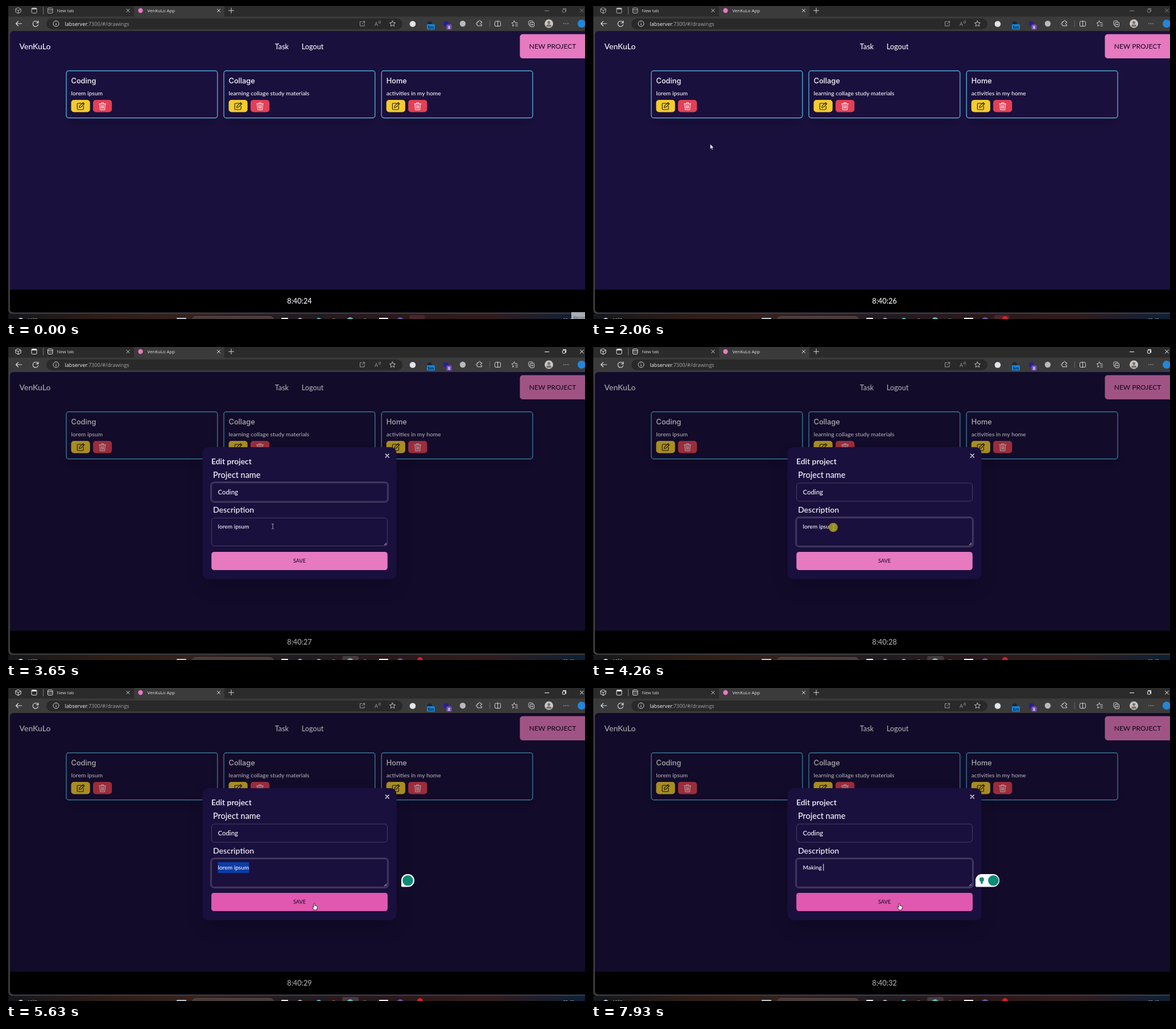
Recreate the animation shown at these times as an HTML page with a canvas. Size 1018 by 550 pixels, loop 7.99 s.

```html
<!DOCTYPE html>
<html lang="en">
<head>
<meta charset="utf-8">
<title>VenKuLo App</title>
<style>
html, body { margin: 0; width: 100%; height: 100%; overflow: hidden; background: #000; }
canvas { display: block; width: 1018px; height: 550px; }
</style>
</head>
<body>
<canvas id="stage" width="1018" height="550"></canvas>
<script>
const stage = document.getElementById('stage');
const layer = stage.cloneNode().getContext('2d');
let ctx = stage.getContext('2d');
const LOOP = 7990;
const UI = 'Lato, "Open Sans", sans-serif';
const HEAD = 'Inter, sans-serif';
const SYS = '"Open Sans", sans-serif';
const BASE = '#1a103d', PINK = '#e779c1', CYAN = '#58c7f3', INK = '#f9f7fd';
const GOLD = '#f3cc30', RED = '#e24056';

// Moments of the story, in ms
const OPEN = 2928, ACTIVE = 3200, PRESS = 4250, RELEASE = 4790, CLEAR = 6000, PILL = 7000;
const KEYS = [6690, 6850, 7050, 7230, 7400, 7540, 7700];
const WORD = 'Making ';
const PATH = [
  [1520, 728, 553], [1720, 600, 460], [1900, 345, 305], [2060, 210, 243], [2260, 121, 210],
  [2400, 119, 179], [3150, 119, 179], [3600, 469, 315], [3990, 469, 315], [4180, 428, 317],
  [4300, 426, 317], [4680, 363, 307], [4850, 363, 307], [5350, 541, 380], [5560, 543, 384]
];

const clamp = (v, a = 0, b = 1) => Math.min(b, Math.max(a, v));
const ramp = (t, start, len) => clamp((t - start) / len);
const easeOut = x => 1 - (1 - x) ** 3;

function box(x, y, w, h, r, fill, stroke, lw = 1) {
  ctx.beginPath();
  ctx.roundRect(x, y, w, h, r);
  if (fill) { ctx.fillStyle = fill; ctx.fill(); }
  if (stroke) { ctx.strokeStyle = stroke; ctx.lineWidth = lw; ctx.stroke(); }
}

function disc(x, y, r, fill, stroke, lw) {
  box(x - r, y - r, 2 * r, 2 * r, r, fill, stroke, lw);
}

function text(s, x, y, size, color, { font = UI, weight = 500, align = 'left' } = {}) {
  ctx.font = `${weight} ${size}px ${font}`;
  ctx.textAlign = align;
  ctx.fillStyle = color;
  ctx.fillText(s, x, y);
}

function width(s, size) {
  ctx.font = `500 ${size}px ${UI}`;
  return ctx.measureText(s).width;
}

function icon(d, x, y, stroke, lw = 1, fill) {
  const p = new Path2D(d);
  ctx.save();
  ctx.translate(x, y);
  ctx.lineCap = ctx.lineJoin = 'round';
  if (fill) { ctx.fillStyle = fill; ctx.fill(p); }
  if (stroke) { ctx.strokeStyle = stroke; ctx.lineWidth = lw; ctx.stroke(p); }
  ctx.restore();
}

function cross(x, y, r, color, lw = 1) {
  icon(`M${-r} ${-r}L${r} ${r}M${r} ${-r}L${-r} ${r}`, x, y, color, lw);
}

// A panel whose shadow is cast by a box smaller by `inset`
function panel(x, y, w, h, r, { alpha, blur, dy, inset }) {
  ctx.save();
  ctx.shadowColor = `rgba(0,0,0,${alpha})`;
  ctx.shadowBlur = blur;
  ctx.shadowOffsetY = dy;
  box(x + inset, y + inset, w - 2 * inset, h - 2 * inset, r, BASE);
  ctx.restore();
  box(x, y, w, h, r, BASE);
}

// Paint on a layer so that overlapping parts fade as one
function grouped(alpha, paint) {
  const main = ctx;
  ctx = layer;
  ctx.clearRect(0, 0, 1018, 550);
  paint();
  ctx = main;
  ctx.globalAlpha = alpha;
  ctx.drawImage(layer.canvas, 0, 0);
  ctx.globalAlpha = 1;
}

const STAR = 'M0 -5L1.5 -1.7L5 -1.4L2.4 1L3.2 4.6L0 2.7L-3.2 4.6L-2.4 1L-5 -1.4L-1.5 -1.7Z';

function drawTabs(active) {
  const c = active ? '#e6e6e6' : '#b4b4b4';
  const ctl = active ? '#fff' : '#858585';
  box(4, 0, 1014, 19, 0, '#2b2b2b');
  box(4, 18.5, 1014, 522.5, [0, 0, 0, 6], '#3b3b3b');
  box(225, -6, 159, 26, 5, '#3b3b3b');

  icon('M0 -5L4.6 -2.5V2.5L0 5L-4.6 2.5V-2.5ZM-4.6 -2.5L0 0L4.6 -2.5M0 0V5', 21.5, 8, c, 1);
  box(45, 3.5, 9, 9, 1.5, null, c, 1);
  box(45, 3.5, 9, 2.5, 1, c);
  icon('M0 -6V6', 65.5, 8, '#777', 1);
  box(73.5, 3.5, 8.5, 9, 1.5, null, c, 1);
  icon('M-4 -1.5H4M-2 1.5H-1.8M0 1.5H.2M2 1.5H2.2', 77.8, 8, c, 1);
  text('New tab', 89.5, 11, 7.8, '#d6d6d6', { font: SYS, weight: 400 });
  cross(214.5, 8, 2.6, '#d0d0d0');
  disc(236.5, 8, 4.2, PINK);
  text('VenKuLo App', 248.5, 11, 7.8, '#e6e6e6', { font: SYS, weight: 400 });
  cross(374, 8, 2.6, '#e0e0e0');
  icon('M-4.5 0H4.5M0 -4.5V4.5', 396, 8, '#d6d6d6');

  icon('M-3.5 0H3.5', 951, 8.5, ctl);
  box(978.5, 6, 5, 5, 1, null, ctl, 1);
  icon('M-1.5 -3.5H3.5V1.5', 981, 8, ctl);
  cross(1012.5, 8, 3, ctl);
}

function drawToolbar() {
  const c = '#cfcfcf', dim = '#9a9a9a';
  icon('M5 0H-5M-1 -4L-5 0L-1 4', 22.5, 31, '#e2e2e2', 1.1);
  icon('M4.6 -1A4.8 4.8 0 1 0 4.6 1.6M4.8 -5V-1.2H1', 52, 31, '#e2e2e2', 1.1);
  box(71, 22, 626, 19, 9.5, '#292929');
  disc(88, 31, 5, null, c, 1);
  icon('M0 -.5V2.4M0 -2.6V-2.5', 88, 31, c, 1.1);
  text('labserver', 103.5, 34.5, 9.1, '#f4f4f4', { font: SYS, weight: 400 });
  text(':7300/#/drawings', 142.5, 34.5, 9.1, '#a5a5a5', { font: SYS, weight: 400 });

  icon('M-1 -3.5H-4V4H3.5V1M1 -4H4V-1M4 -4L-.5 .5', 626.5, 31, dim);
  text('A', 648, 35, 9.5, dim, { font: SYS, weight: 400 });
  icon('M0 -2Q1.4 -.5 0 1M2 -3.5Q4 -.7 2 2', 655.5, 29, dim, .9);
  icon(STAR, 679.5, 31, c, .9);

  disc(715, 31.5, 5.3, '#e2e4e8');
  disc(745, 31, 4, '#1c2733');
  box(740, 32, 14, 9.5, 1.5, '#1683d8');
  text('5m', 747, 39.5, 7, '#06131f', { font: SYS, weight: 600, align: 'center' });
  box(770, 27, 8, 8, 1, '#27208c');
  box(774.5, 32.5, 9, 9, 1.5, '#7a4fc0');
  text('8', 779, 40, 7, '#fff', { font: SYS, weight: 600, align: 'center' });
  disc(803, 31, 5.2, '#b9b9b9');
  icon('M-3.5 -3H-1.2A1.6 1.6 0 1 1 1.6 -3H4V-.6A1.6 1.6 0 1 0 4 2V4.4H-3.5V2A1.6 1.6 0 1 1 -3.5 -.6Z', 832.5, 30.5, c);
  icon('M0 -5.5V5.5', 850.5, 31, '#666');
  box(859.5, 27, 10, 8.5, 1.5, null, c, 1);
  icon('M0 -5V5', 864.5, 31, c);
  icon('M-1 -5L.5 -1.8H4.5M-1 -5L-2.4 -1.8L-5.5 -1.4L-3 1L-3.8 4.5L-1 2.8M1.5 1H5M1.5 4H5', 894.5, 31, c);
  box(919, 26, 7, 8, 1.5, null, c, 1);
  box(921.5, 28.5, 7, 8, 1.5, '#3b3b3b', c, 1);
  icon('M-1.7 0H1.7M0 -1.7V1.7', 925, 32.5, c, .9);
  disc(954.5, 31, 7.5, '#c9c6c3');
  disc(954.5, 29, 2.5, '#77726f');
  box(950, 32.5, 9, 4, [4, 4, 1, 1], '#77726f');
  for (let i = -1; i < 2; i++) disc(984.5 + i * 3.6, 31, .8, c);
  disc(1012, 31, 7, '#2287d8');
}

function drawTaskbar(t) {
  const g = ctx.createLinearGradient(0, 0, 1018, 0);
  ['#14171c', '#2e1d14', '#35221d', '#211c22', '#2b181a', '#321b1c', '#0c2137']
    .forEach((c, i) => g.addColorStop(i / 6, c));
  box(4, 541, 1014, 9, 0, g);
  disc(26, 553, 5, '#c9d4df');
  text('10°C', 38, 553.5, 7.6, '#f1f1f1', { font: SYS, weight: 400 });
  text('09:40', 979.5, 554, 7.6, '#f1f1f1', { font: SYS, weight: 400 });
  box(300, 548, 17, 9, 1, '#b8c8d2');
  box(327, 545.5, 144, 14, 7, '#493b39', '#6b5855', .7);
  if (t >= 2700) box(591, 543, 29, 10, 3, '#44393d');
  else box(709, 543, 27, 10, 3, '#4b2530');
  box(484, 548, 12, 8, 1, '#f0f0f0');
  disc(517, 553, 5, '#b3aeb1');
  disc(550, 553, 5, '#4ec5c2');
  disc(576, 554, 5, '#ae7555');
  disc(605, 553, 6, '#52c6bd');
  disc(631, 554, 5, '#4d8b65');
  box(656, 548, 16, 7, 0, '#fff');
  disc(693, 553, 6, '#6958aa');
  if (t >= 200) disc(728, 550, 5, '#d5202a');
}

function drawTip(t) {
  ctx.globalAlpha = 1 - ramp(t, 1190, 190);
  box(994, 538, 30, 14, 0, '#a9adb6');
  text('Record', 997, 549.5, 7.6, '#50545c', { font: SYS, weight: 400 });
  ctx.globalAlpha = 1;
}

function drawCard(x, title, note) {
  panel(x, 113.9, 265.8, 82.7, 4, { alpha: .14, blur: 17, dy: 13, inset: 3 });
  box(x, 113.9, 265.8, 82.7, 4, null, CYAN, 1.2);
  text(title, x + 8.5, 136, 12.8, INK, { font: HEAD });
  text(note, x + 8.5, 156.5, 10.3, INK);
  box(x + 8.5, 165, 33.2, 21.5, 5, GOLD);
  box(x + 47, 165, 33.2, 21.5, 5, RED);
  icon('M1 -5H-4.5Q-6 -5 -6 -3.5V4.5Q-6 6 -4.5 6H3.5Q5 6 5 4.5V0M-2.5 2.5L-1.8 -.6L4.3 -6.4L6.6 -4.2L.6 1.8ZM3 -5L5.2 -2.9',
    x + 25.2, 176, '#211a08', 1.1);
  icon('M-6 -4H6M-2 -4V-6H2V-4M-4.8 -4L-4 6.4H4L4.8 -4M-2 -1.5L-1.8 4M0 -1.5V4M2 -1.5L1.8 4',
    x + 63.6, 176, INK, 1);
}

function drawPage(t) {
  ctx.save();
  ctx.beginPath();
  ctx.roundRect(7, 44, 1020, 494.5, 6);
  ctx.clip();
  box(7, 44, 1011, 495, 0, BASE);
  text('VenKuLo', 23.5, 76.3, 14, INK);
  text('Task', 472.8, 76, 12.6, INK);
  text('Logout', 519.8, 76, 12.6, INK);
  box(903.5, 49.5, 125, 42.5, 5, PINK);
  text('NEW PROJECT', 961, 75.2, 12, '#230e2a', { align: 'center' });
  drawCard(106, 'Coding', 'lorem ipsum');
  drawCard(383, 'Collage', 'learning collage study materials');
  drawCard(660.2, 'Home', 'activities in my home');
  box(7, 498.5, 1011, 40, 0, '#000');
  text('8:40:' + (24 + Math.floor((t + 200) / 1000)), 516, 523, 12.8, INK, { align: 'center' });

  const p = easeOut(ramp(t, OPEN, 200));
  if (p > 0) {
    // The scrim colour and its opacity ease in together
    box(7, 44, 1011, 495, 0, `rgba(0,0,0,${.31 * p * p})`);
    grouped(p, () => drawModal(t, .9 + .1 * p));
  }
  ctx.restore();
}

function caret(x, y, t, since) {
  if ((t - since) % 1000 < 500) box(x, y, 1, 12, 0, INK);
}

function field(y, h, focused) {
  box(361.5, y, 309, h, 5, BASE, 'rgba(249,247,253,.2)', 1);
  if (focused) box(359.9, y - 1.7, 312.2, h + 3.4, 6, null, 'rgba(249,247,253,.26)', 1.2);
}

// Index of the letter edge nearest to the pointer
function edgeAt(s, x) {
  let best = 0, gap = Math.abs(x);
  for (let i = 1; i <= s.length; i++) {
    const d = Math.abs(width(s.slice(0, i), 10.2) - x);
    if (d < gap) { best = i; gap = d; }
  }
  return best;
}

function drawDescription(t) {
  const x = 372.5, y = 319.3, size = 10.2, old = 'lorem ipsum';
  if (t < CLEAR) {
    if (t >= PRESS) {
      const px = pointer(Math.min(t, RELEASE))[0];
      const from = width(old.slice(0, edgeAt(old, px - x)), size);
      const end = width(old, size);
      if (from < end) box(x + from, 306, end - from, 19, 0, '#0b3ca4');
      else caret(x + end, 309, t, PRESS);
    }
    text(old, x, y, size, INK);
    return;
  }
  const n = KEYS.filter(k => t >= k).length;
  const typed = WORD.slice(0, n);
  text(typed, x, y, size, INK);
  caret(x + width(typed, size), 309, t, n ? KEYS[n - 1] : CLEAR);
}

function drawModal(t, scale) {
  ctx.save();
  ctx.translate(516, 292);
  ctx.scale(scale, scale);
  ctx.translate(-516, -292);
  panel(345.5, 176, 341, 232, 10, { alpha: .25, blur: 33, dy: 16, inset: 8 });
  text('Edit project', 361, 205.5, 13.9, INK, { weight: 600 });
  cross(670.3, 191, 3, INK, 1.2);
  text('Project name', 364, 229.6, 14.4, INK);
  text('Description', 364, 290.8, 14.1, INK);
  field(239, 32, t < PRESS);
  text('Coding', 372.5, 259.2, 11.4, INK);
  if (t < PRESS) caret(373 + width('Coding', 11.4), 249, t, OPEN);
  field(300.5, 49, t >= PRESS);
  icon('M-4 0L0 -4M-1.5 0L0 -1.5', 669, 348, '#d8d5df', .9);
  drawDescription(t);
  box(361.2, 359.9, 309.6, 32.2, 5, PINK);
  const hover = ramp(t, 5320, 180);
  if (hover) box(361.2, 359.9, 309.6, 32.2, 5, `rgba(224,88,176,${hover})`);
  text('SAVE', 516, 379.4, 9.2, '#230e2a', { align: 'center' });
  ctx.restore();
}

function drawHelper(t) {
  if (t < PRESS + 150) return;
  ctx.globalAlpha = ramp(t, PRESS + 150, 120);
  const grow = easeOut(ramp(t, PILL, 220));
  const x = 695 - 19 * grow;
  box(x, 327, 718 - x, 22.5, [11, 11, 11, 2], '#fff');
  if (grow > .6) {
    disc(687, 336.5, 4, '#0f8a78');
    box(685.3, 339.5, 3.4, 4.5, 1, '#0f8a78');
  }
  disc(706.5 + grow, 338.3, 9.3, '#0f8a78');
  ctx.globalAlpha = 1;
}

function pointer(t) {
  const i = PATH.findIndex(k => k[0] > t);
  if (i < 0) return PATH[PATH.length - 1].slice(1);
  if (!i) return PATH[0].slice(1);
  const [t0, x0, y0] = PATH[i - 1], [t1, x1, y1] = PATH[i];
  const f = (t - t0) / (t1 - t0);
  return [x0 + (x1 - x0) * f, y0 + (y1 - y0) * f];
}

function drawPointer(t) {
  if (t < PATH[0][0]) return;
  const [x, y] = pointer(t);
  const down = (t >= 2760 && t < 2860) || (t >= PRESS && t < RELEASE);
  if (down) disc(x - .7, y, 8, '#958b1b');
  const inModal = t > OPEN && x > 361 && x < 671;
  if (inModal && ((y > 300 && y < 350) || (y > 239 && y < 271))) {
    icon('M-1.6 -4.3Q0 -4.3 0 -3.5Q0 -4.3 1.6 -4.3M0 -3.5V3.5M-1.6 4.3Q0 4.3 0 3.5Q0 4.3 1.6 4.3', x, y, '#c4c1cc', .8);
  } else if (inModal && y >= 360 && y < 392) {
    icon('M-2 -5Q-1 -6.3 0 -5V-1.5Q1 -2.2 1.7 -1.2Q2.8 -1.7 3.2 -.6Q4.2 -.8 4.2 .6V3L3 6H-1.5L-4 2Q-4.6 .3 -3.2 .3L-2 1.3Z',
      x, y, '#1c1020', .9, '#fff');
  } else {
    icon('M0 0V8.5L2 6.7L3.4 10L4.9 9.4L3.5 6.2H6.2Z', x, y, '#16102c', .6, '#fff');
  }
}

function draw(t) {
  box(0, 0, 1018, 550, 0, '#000');
  drawTaskbar(t);
  drawTabs(t >= ACTIVE);
  drawToolbar();
  drawPage(t);
  drawTip(t);
  drawHelper(t);
  drawPointer(t);
}

const start = performance.now();
function tick() {
  draw((performance.now() - start) % LOOP);
  requestAnimationFrame(tick);
}
tick();
</script>
</body>
</html>
```
